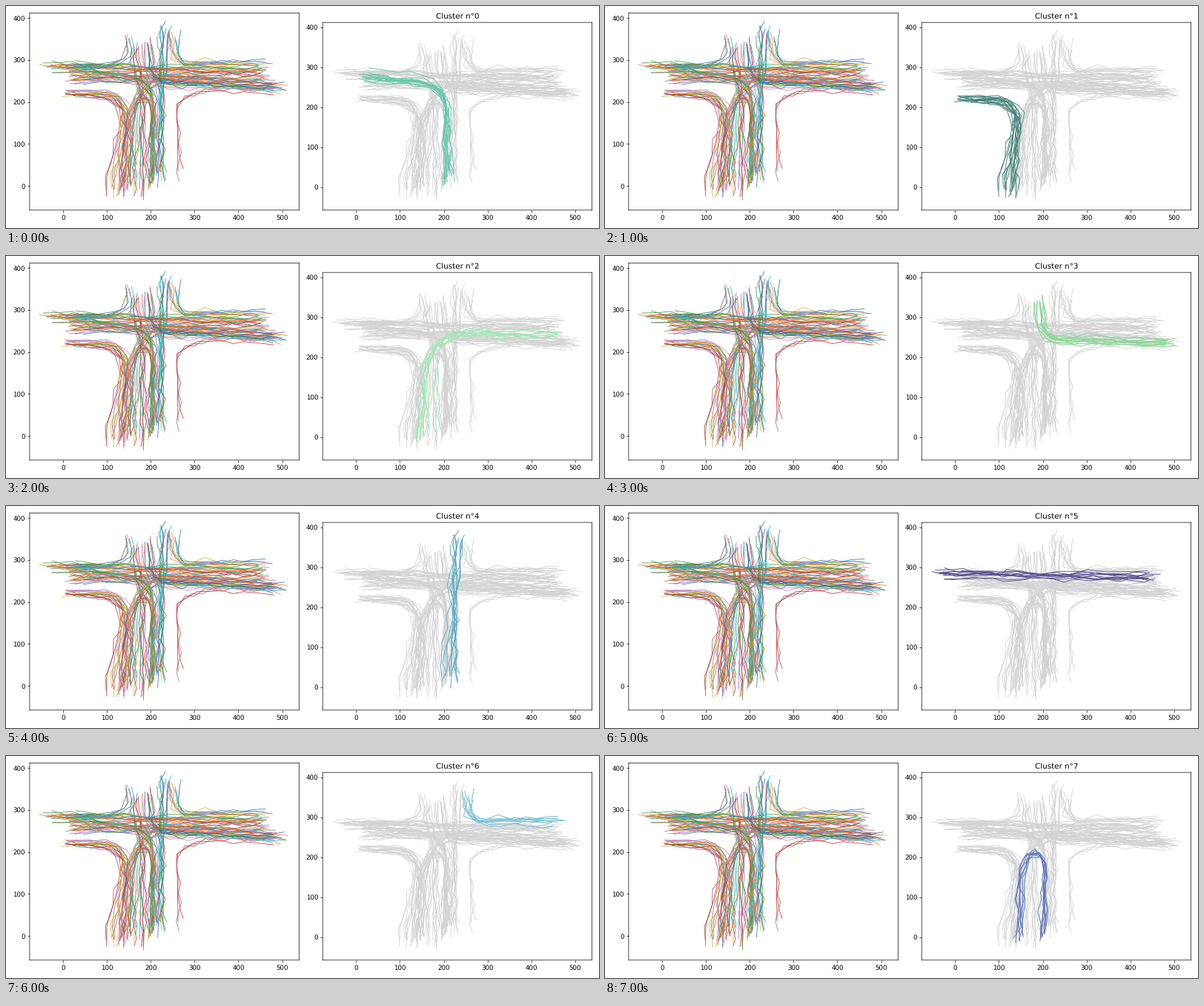
These frames come from a looping animation (800x300 px, 8000 ms). A matplotlib script:

```python
import numpy as np
import matplotlib.pyplot as plt
from matplotlib.animation import FuncAnimation
from matplotlib.collections import LineCollection

DPI = 62.5
LINE = 0.95
COLORS = ["#60c9ac", "#43837a", "#9ceab4", "#86d994",
          "#5aa9c4", "#58498f", "#6cc0d8", "#5873bb"]
rng = np.random.default_rng(12)
plt.rcParams["text.hinting"] = "none"


def rounded(corners, radius):
    """A polyline whose inner corners are replaced by quadratic arcs."""
    pts = np.array(corners, float)
    u = np.linspace(0, 1, 9)[:, None]
    out = [pts[:1]]
    for before, corner, after in zip(pts, pts[1:], pts[2:]):
        ends = []
        for other in (before, after):
            length = np.hypot(*(other - corner))
            ends.append(corner + (other - corner) * min(radius / length, 0.5))
        out.append((1 - u) ** 2 * ends[0] + 2 * u * (1 - u) * corner + u ** 2 * ends[1])
    return np.vstack(out + [pts[-1:]])


def bundle(count, *corners, width=10, flare=1, radius=60, trim=35, jitter=4, step=32):
    """Noisy trajectories along one route, flaring towards its end."""
    pts = rounded(corners, radius)
    dist = np.r_[0, np.cumsum(np.hypot(*np.diff(pts, axis=0).T))]
    tracks = []
    for _ in range(count):
        lo, hi = rng.uniform(0, trim), dist[-1] - rng.uniform(0, trim)
        s = np.linspace(lo, hi, int((hi - lo) / step) + 2)
        s[1:-1] += rng.uniform(-9, 9, len(s) - 2)
        xy = np.column_stack([np.interp(s, dist, pts[:, k]) for k in (0, 1)])
        tangent = np.gradient(xy, axis=0)
        tangent /= np.hypot(*tangent.T)[:, None]
        normal = tangent[:, ::-1] * [-1, 1]
        side = np.linspace(*(width * rng.uniform(-1, 1, 2) * [1, flare]), len(s))
        tracks.append(xy + normal * side[:, None] + rng.normal(0, jitter, xy.shape))
    return tracks


# Shown one at a time in the right panel
clusters = [
    # left to bottom, inner lane
    bundle(13, (0, 276), (205, 254), (210, 5), width=7, flare=1.7)
    + bundle(1, (15, 306), (195, 286), (207, 5)),
    # left to bottom, outer lane
    bundle(17, (0, 221), (146, 215), (116, -25), width=8, flare=3),
    # bottom to right
    bundle(8, (148, -12), (166, 262), (475, 256), width=9, radius=100)
    + bundle(2, (182, -8), (188, 262), (470, 257), width=5),
    # top to right
    bundle(12, (188, 352), (196, 241), (508, 235), width=14, radius=45),
    # top to bottom
    bundle(11, (234, 393), (215, 0), width=14, flare=1.8),
    # straight across
    bundle(12, (-50, 284), (468, 279), width=13),
    # top to right, upper lane
    bundle(8, (254, 372), (254, 289), (474, 287), width=12, radius=40),
    # turn back to the bottom
    bundle(8, (144, -14), (156, 214), (209, 214), (200, -10), width=8, trim=20),
]

# Seen only as part of the whole
others = (
    bundle(10, (5, 257), (200, 258), (510, 236), width=14, trim=45)
    + bundle(5, (10, 268), (472, 268), width=14)
    + bundle(5, (-10, 282), (158, 290), (158, 362), width=14, radius=40)
    + bundle(8, (168, -36), (178, 180), (162, 362), width=16)
    + bundle(3, (490, 228), (258, 222), (264, 10), width=9)
)

tracks = [track for group in clusters for track in group] + others

fig, (whole, single) = plt.subplots(1, 2, figsize=(12.8, 4.8), dpi=DPI, facecolor="white")
for ax in (whole, single):
    ax.set(xlim=(-76.3, 538.5), ylim=(-57.5, 411.8),
           xticks=range(0, 501, 100), yticks=range(0, 401, 100))
    for spine in ax.spines.values():
        spine.set_snap(False)

for n, k in enumerate(rng.permutation(len(tracks))):
    whole.plot(*tracks[k].T, color=f"C{n % 10}", lw=LINE, alpha=0.9)

single.add_collection(LineCollection(tracks, colors="lightgrey", linewidths=LINE, zorder=1))
focus = LineCollection([], linewidths=LINE, zorder=2)
single.add_collection(focus)

# Only the right panel makes room for a title
fig.tight_layout()
full = whole.get_position()
title = single.set_title("Cluster n°0")
fig.tight_layout()
whole.set_position(full)


def update(i):
    focus.set_segments(clusters[i])
    focus.set_color(COLORS[i])
    title.set_text(f"Cluster n°{i}")
    return focus, title


anim = FuncAnimation(fig, update, frames=len(clusters), interval=1000,
                     repeat=True, repeat_delay=0, blit=False)
plt.show()
```
